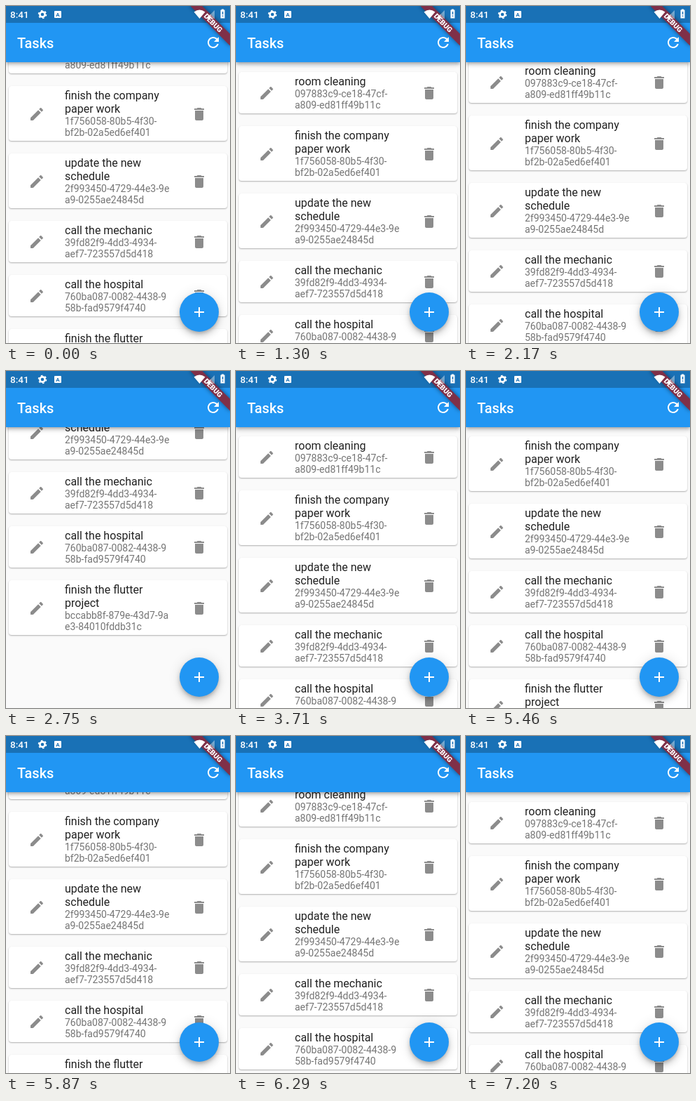
These frames come from a looping animation (320x480 px, 8640 ms). An HTML page:

```html
<!DOCTYPE html>
<html lang="en">
<head>
<meta charset="utf-8">
<title>Tasks</title>
<style>
html, body { margin: 0; width: 100%; height: 100%; overflow: hidden; }
body { font-family: Roboto, sans-serif; }
#app { position: relative; width: 320px; height: 480px; overflow: hidden; background: #fafafa; }
#app > *, #list > * { position: absolute; }
#list { left: 0; top: 0; width: 320px; }
.card { left: 4px; width: 312px; border-radius: 4px; background: #fff;
  box-shadow: 0 1px 2px rgba(0, 0, 0, .3); }
.card div { position: absolute; left: 80px; top: 4px; white-space: nowrap; }
.card p { margin: 0; }
.title { font-size: 16px; line-height: 19px; color: #212121; }
.id { font-size: 14px; line-height: 16px; color: #757575; }
.card svg { position: absolute; top: 50%; margin-top: -11.5px; fill: #8c8c8c; }
.edit { left: 28px; }
.bin { left: 260px; }
#glow { left: -20px; width: 360px; background: #2196f3; }
#bar { left: 0; top: 0; width: 320px; height: 80px; background: #2196f3;
  box-shadow: 0 2px 4px -1px rgba(0, 0, 0, .2), 0 4px 5px rgba(0, 0, 0, .14), 0 1px 10px rgba(0, 0, 0, .12); }
#bar h1 { position: absolute; left: 16px; top: 41px; margin: 0; font: 500 20px/24px Roboto, sans-serif; color: #fff; }
#bar svg { position: absolute; left: 284px; top: 40px; fill: #fff; }
#status { left: 0; top: 0; width: 320px; height: 24px; background: #1971b6; }
#fab { left: 248px; top: 408px; width: 56px; height: 56px; border-radius: 50%; background: #2196f3;
  box-shadow: 0 3px 5px -1px rgba(0, 0, 0, .2), 0 6px 10px rgba(0, 0, 0, .14), 0 1px 18px rgba(0, 0, 0, .12); }
#fab svg { position: absolute; left: 16px; top: 16px; fill: #fff; }
#top { left: 0; top: 0; }
</style>
</head>
<body>
<div id="app">
  <div id="list"></div>
  <div id="glow"></div>
  <div id="bar">
    <h1>Tasks</h1>
    <svg width="24" height="24"><path d="M17.65 6.35C16.2 4.9 14.21 4 12 4c-4.42 0-7.99 3.58-7.99 8s3.57 8 7.99 8c3.73 0 6.84-2.55 7.73-6h-2.08c-.82 2.33-3.04 4-5.65 4-3.31 0-6-2.69-6-6s2.69-6 6-6c1.66 0 3.14.69 4.22 1.78L13 11h7V4z"/></svg>
  </div>
  <div id="status"></div>
  <div id="fab"><svg width="24" height="24"><path d="M19 13h-6v6h-2v-6H5v-2h6V5h2v6h6v2z"/></svg></div>
  <svg id="top" width="320" height="80" fill="#fff" font-family="Roboto, sans-serif">
    <g transform="translate(320 0) rotate(45)">
      <path d="M-40 28h80v12h-80z" fill="#7f3048" style="filter: drop-shadow(0 0 3px rgba(0,0,0,.5))"/>
      <text y="37.6" font-size="10.2" font-weight="900" text-anchor="middle">DEBUG</text>
    </g>
    <text x="6" y="17" font-size="13.5" font-weight="500">8:41</text>
    <circle cx="52" cy="12" r="3.6" fill="none" stroke="#fff" stroke-width="2.6"/>
    <circle cx="52" cy="12" r="5.5" fill="none" stroke="#fff" stroke-width="1.6" stroke-dasharray="2.6 3.16"/>
    <rect x="69" y="7" width="10" height="10" rx="1"/>
    <text x="74" y="15" font-size="8" font-weight="700" text-anchor="middle" fill="#1971b6">A</text>
    <path d="M268.5 8.5Q276.5 2.5 284.5 8.5L276.5 18z"/>
    <path d="M298 6v12h-12z" fill-opacity=".4"/>
    <path d="M292 12v6h-6z"/>
    <path d="M306.5 5.5h1.5v-1h3v1h1.5v12h-6z"/>
    <path d="M308.8 8h1.5v4h-1.5zM308.8 13.5h1.5v1.5h-1.5z" fill="#1971b6"/>
  </svg>
</div>
<script>
const LOOP = 8640, END = 219;
const tasks = [
  ['room cleaning', '097883c9-ce18-47cf-<br>a809-ed81ff49b11c'],
  ['finish the company<br>paper work', '1f756058-80b5-4f30-<br>bf2b-02a5ed6ef401'],
  ['update the new<br>schedule', '2f993450-4729-44e3-9e<br>a9-0255ae24845d'],
  ['call the mechanic', '39fd82f9-4dd3-4934-<br>aef7-723557d5d418'],
  ['call the hospital', '760ba087-0082-4438-9<br>58b-fad9579f4740'],
  ['finish the flutter<br>project', 'bccabb8f-879e-43d7-9a<br>e3-84010fddb31c']
];
const pencil = 'M3 17.25V21h3.75L17.81 9.94l-3.75-3.75zM20.71 7.04c.39-.39.39-1.02 0-1.41l-2.34-2.34c-.39-.39-1.02-.39-1.41 0l-1.83 1.83 3.75 3.75z';
const bin = 'M6 19c0 1.1.9 2 2 2h8c1.1 0 2-.9 2-2V7H6zM19 4h-3.5l-1-1h-5l-1 1H5v2h14z';
const icon = (name, d) => `<svg class="${name}" width="24" height="24"><path d="${d}"/></svg>`;

const list = document.getElementById('list');
const glow = document.getElementById('glow').style;

let y = 94;
list.innerHTML = tasks.map(([title, id]) => {
  const h = title.includes('<br>') ? 78 : 59;
  const card = `<div class="card" style="top:${y}px;height:${h}px">${icon('edit', pencil)}
    <div><p class="title">${title}</p><p class="id">${id}</p></div>${icon('bin', bin)}</div>`;
  y += h + 18;
  return card;
}).join('');

const steady = p => p;
const speedUp = p => p ** 3;
const slowDown = p => 1 - (1 - p) ** 2;

// A swipe runs from start to stop; one that hits an edge glows until `fade`.
const swipes = [
  { start: 40, stop: 200, from: 57, to: END, ease: steady, fade: 800 },
  { start: 960, stop: 1280, from: END, to: 0, ease: speedUp, fade: 1800 },
  { start: 2010, stop: 2400, from: 0, to: END, ease: speedUp, fade: 2760 },
  { start: 2760, stop: 3000, from: END, to: 0, ease: speedUp, fade: 3420 },
  { start: 3630, stop: 4110, from: 0, to: END, ease: speedUp, fade: 4560 },
  { start: 4560, stop: 5870, from: END, to: 63, ease: slowDown },
  { start: 6040, stop: 6333, from: 63, to: 0, ease: speedUp, fade: 7200 }
];

function glowAt(t, { stop, fade }) {
  if (!fade || t < stop || t > fade) return 0;
  const p = (t - stop) / (fade - stop);
  return p < .2 ? p / .2 : ((1 - p) / .8) ** 1.5;
}

function draw(now) {
  const t = now % LOOP;
  const s = swipes.findLast(s => t >= s.start) || swipes[0];
  const p = Math.min(1, Math.max(0, (t - s.start) / (s.stop - s.start)));
  const pos = Math.round(s.from + (s.to - s.from) * s.ease(p));
  list.style.transform = `translateY(${-pos}px)`;

  const k = glowAt(t, s), h = 44 * k;
  glow.top = (s.to ? 480 - h : 80) + 'px';
  glow.borderRadius = s.to ? '50% 50% 0 0 / 100% 100% 0 0' : '0 0 50% 50% / 0 0 100% 100%';
  glow.height = h + 'px';
  glow.opacity = .18 * k;
}

let start;
function tick(now) {
  start ??= now;
  draw(now - start);
  requestAnimationFrame(tick);
}
draw(0);
requestAnimationFrame(tick);
</script>
</body>
</html>
```
